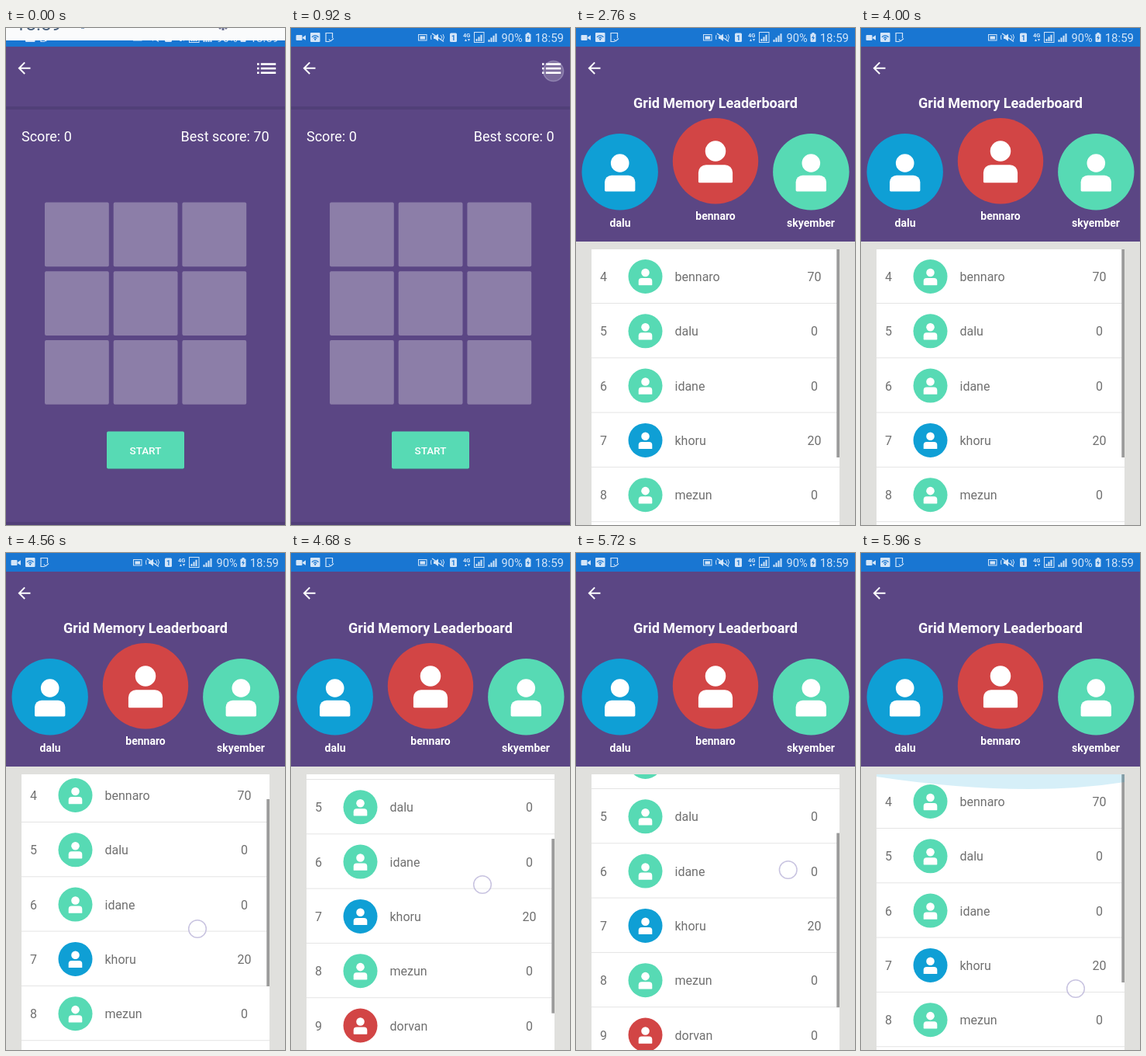
Recreate the animation shown at these times as an HTML page with a canvas. Size 360 by 640 pixels, loop 6 s.

```html
<!DOCTYPE html>
<html lang="en">
<head>
<meta charset="utf-8">
<title>Leaderboard</title>
<style>
html, body { margin: 0; width: 100%; height: 100%; overflow: hidden; background: #5b4684; }
canvas { display: block; width: 360px; height: 640px; }
</style>
</head>
<body>
<canvas id="stage"></canvas>
<script>
const W = 360, H = 640, LOOP = 6000, STEP = 40;
const PURPLE = '#5b4684', LINE = '#513f78', GREEN = '#57dab4', RED = '#d24545', BLUE = '#0f9fd5';
const BAR = '#1976d2', ICON = '#d3e5f8';
const LIST_TOP = 285, PITCH = 70.3, MAX_SCROLL = 133;
const ROWS = [
  [4, 'bennaro', 70, GREEN], [5, 'dalu', 0, GREEN], [6, 'idane', 0, GREEN],
  [7, 'khoru', 20, BLUE], [8, 'mezun', 0, GREEN], [9, 'dorvan', 0, RED], [10, 'tarven', 0, GREEN]
];
// Keyframes: [time, value]
const SCROLL = [[4520, 0], [4560, 8], [4680, 63], [4760, 101], [4840, MAX_SCROLL],
  [5560, MAX_SCROLL], [5600, 122], [5720, 51], [5800, 0]];
const DRAG_UP = [[4520, 502], [4560, 484], [4680, 427], [4880, 328]];
const DRAG_DOWN = [[5520, 318], [5560, 322], [5600, 337], [5720, 408], [5960, 561]];

const canvas = document.getElementById('stage');
const c = canvas.getContext('2d');
const dpr = window.devicePixelRatio || 1;
canvas.width = W * dpr;
canvas.height = H * dpr;

const clamp = v => Math.max(0, Math.min(1, v));
const ramp = (t, a, b) => clamp((t - a) / (b - a));

function track(keys, t) {
  if (t <= keys[0][0]) return keys[0][1];
  for (let i = 1; i < keys.length; i++) {
    const [a, va] = keys[i - 1], [b, vb] = keys[i];
    if (t <= b) return va + (vb - va) * (t - a) / (b - a);
  }
  return keys[keys.length - 1][1];
}

function rect(x, y, w, h, color) {
  c.fillStyle = color;
  c.fillRect(x, y, w, h);
}

function round(x, y, w, h, r, color) {
  c.fillStyle = color;
  c.beginPath();
  c.roundRect(x, y, w, h, r);
  c.fill();
}

function disc(x, y, r, color) {
  c.fillStyle = color;
  c.beginPath();
  c.arc(x, y, r, 0, 7);
  c.fill();
}

function poly(points, color) {
  c.fillStyle = color;
  c.beginPath();
  points.forEach(([x, y]) => c.lineTo(x, y));
  c.fill();
}

function text(s, x, y, size, color, align = 'left', weight = 400) {
  c.font = `${weight} ${size}px Roboto, sans-serif`;
  c.textAlign = align;
  c.fillStyle = color;
  c.fillText(s, x, y);
}

function stroke(points, color, width) {
  c.strokeStyle = color;
  c.lineWidth = width;
  c.beginPath();
  points.forEach(([x, y]) => c.lineTo(x, y));
  c.stroke();
}

function box(x, y, w, h) {
  c.strokeStyle = ICON;
  c.lineWidth = 1;
  c.strokeRect(x, y, w, h);
}

function bars(x, y, n) {
  for (let i = 0; i < n; i++) rect(x + i * 3, y - 3 - i * 2.6, 2, 3 + i * 2.6, ICON);
}

function waves(x, y, radii) {
  c.strokeStyle = BAR;
  c.lineWidth = 1.2;
  for (const r of radii) {
    c.beginPath();
    c.arc(x, y, r, -Math.PI * .8, -Math.PI * .2);
    c.stroke();
  }
}

function statusBar() {
  rect(0, 0, W, 24, BAR);
  // left icons
  round(6.5, 9, 8, 7, 1, ICON);
  poly([[15, 12], [19, 9.3], [19, 15.7], [15, 13.3]], ICON);
  round(25, 6, 12.5, 12, 1, ICON);
  waves(31.2, 15, [2.6, 5.2]);
  disc(31.2, 14.8, 1.1, BAR);
  stroke([[50, 17.5], [45, 17.5], [45, 6.5], [53.5, 6.5], [53.5, 13]], ICON, 1.2);
  stroke([[49, 14.5], [51, 17], [55, 13.5]], ICON, 1.2);
  // right icons
  box(164.5, 8.5, 10.5, 7.5);
  rect(166.5, 10.5, 6.5, 4, ICON);
  poly([[184, 10.5], [186, 10.5], [190, 7.5], [190, 17], [186, 14], [184, 14]], ICON);
  stroke([[182, 7], [197, 17.5]], ICON, 1.4);
  stroke([[181, 9], [180.5, 12], [181, 15]], ICON, 1);
  stroke([[193, 9], [195, 12], [193, 15]], ICON, 1);
  stroke([[196, 8], [197.5, 12], [196, 16]], ICON, 1);
  round(205, 6.5, 9, 11.5, 1.5, ICON);
  text('1', 209.5, 15.8, 9, BAR, 'center', 700);
  text('4G', 222, 12, 7.5, ICON, 'left', 700);
  poly([[224, 17], [227, 17], [225.5, 14]], ICON);
  poly([[228, 14], [231, 14], [229.5, 17]], ICON);
  box(236.5, 5.5, 12.5, 13);
  bars(238.5, 17, 3);
  bars(254.5, 18, 4);
  text('90%', 271.5, 17.8, 14.6, ICON);
  round(302.5, 7.5, 7, 10.5, 1, ICON);
  rect(304.5, 6, 3, 2, ICON);
  poly([[306.8, 8.8], [304, 13], [305.8, 13], [305.2, 16.6], [308, 12], [306.2, 12]], BAR);
  text('18:59', 352, 17.8, 15, ICON, 'right');
}

function backArrow() {
  const shape = new Path2D('M20 11H7.83l5.59-5.59L12 4l-8 8 8 8 1.41-1.41L7.83 13H20z');
  c.save();
  c.translate(11.5, 39.7);
  c.fillStyle = '#fff';
  c.fill(shape);
  c.restore();
}

function listIcon(alpha) {
  c.globalAlpha = alpha;
  for (let i = 0; i < 3; i++) {
    const y = 45.2 + i * 5.6;
    rect(324, y, 2.6, 2.6, '#fff');
    rect(328.8, y, 19.4, 2.6, '#fff');
  }
  c.globalAlpha = 1;
}

function touch(x, y, r = 11.3) {
  disc(x, y, r, 'rgba(255,255,255,.4)');
  c.strokeStyle = 'rgba(190,185,218,.85)';
  c.lineWidth = 1.5;
  c.beginPath();
  c.arc(x, y, r, 0, 7);
  c.stroke();
}

function avatar(x, y, r, color) {
  disc(x, y, r, color);
  round(x - .4 * r, y + .09 * r, .8 * r, .42 * r, [.18 * r, .18 * r, .03 * r, .03 * r], '#fff');
  disc(x, y - .23 * r, .28 * r, color);
  disc(x, y - .23 * r, .24 * r, '#fff');
}

// Notification panel sliding away above the status bar
function shade(t) {
  const h = 16 * (1 - ramp(t, 0, 200)) ** 2;
  if (h < .3) return;
  rect(0, 0, W, h, '#fafbfc');
  text('18:59', 12, h - 13, 24, '#48607c');
  c.save();
  c.translate(280, h - 20);
  for (let i = 0; i < 8; i++) {
    c.rotate(Math.PI / 4);
    rect(-1.5, 3, 3, 4, '#6d7191');
  }
  c.restore();
  rect(97, h - 17, 4, 2, '#8aa2bd');
}

function gameScreen(t) {
  rect(0, 0, W, H, PURPLE);
  rect(0, 101, W, 4, LINE);
  rect(0, 636, W, 4, LINE);
  statusBar();
  backArrow();
  const held = 1 - ramp(t, 1840, 2120);
  listIcon(held);
  if (t >= 920 && held > 0) {
    c.globalAlpha = held * .5;
    touch(338.6, 55.6, 13);
    c.globalAlpha = 1;
  }
  text('Score: 0', 20, 145.5, 18, '#fff');
  text('Best score: ' + (t < 80 ? 70 : 0), 339.5, 145.5, 18, '#fff', 'right');
  for (let i = 0; i < 9; i++)
    round(50 + i % 3 * 88.7, 224.5 + Math.floor(i / 3) * 88.7, 82.8, 82.8, 2, '#8c7ea8');
  round(130, 520.5, 100, 48, 2, '#4d557f');
  round(130, 519.5, 100, 48, 2, GREEN);
  text('START', 180, 549, 13.5, '#fff', 'center', 500);
  shade(t);
}

function glow(edge, depth, x) {
  c.fillStyle = 'rgba(15,159,213,.17)';
  c.beginPath();
  c.moveTo(20, edge);
  c.lineTo(20, edge + depth * .15);
  c.quadraticCurveTo(x - 70, edge + depth * 1.55, 340, edge + depth * .5);
  c.lineTo(340, edge);
  c.fill();
}

function list(t) {
  const scroll = track(SCROLL, t);
  rect(0, 275, W, 365, '#e0e0dd');
  c.save();
  c.beginPath();
  c.rect(20, LIST_TOP, 320, H - LIST_TOP);
  c.clip();
  rect(20, LIST_TOP, 320, H, '#fff');
  ROWS.forEach(([rank, name, score, color], i) => {
    const y = 320 + i * PITCH - scroll;
    text(rank, 31, y + 6, 16, '#707070');
    avatar(89.5, y, 22, color);
    text(name, 127.5, y + 6, 16, '#707070');
    text(score, 307.5, y + 6, 16, '#707070', 'center');
    rect(20, y + 34, 320, 1, '#e4e4e4');
  });
  // scroll indicator
  let alpha = 1;
  if (t < 4520) alpha = 1 - ramp(t, 4000, 4200);
  else if (t < 5560) alpha = 1 - ramp(t, 5120, 5360);
  const top = LIST_TOP + Math.min(scroll * 4, 44 + scroll * .62);
  c.globalAlpha = alpha;
  rect(336.3, top, 3.7, 553 + scroll * .63 - top, '#9b9b9b');
  c.globalAlpha = 1;
  if (t > 5800) glow(LIST_TOP, 20 * ramp(t, 5800, 5960), 277);
  if (t > 4840 && t < 5120) glow(H, -12 * (1 - ramp(t, 4880, 5120)), 250);
  c.restore();
}

function boardScreen(t) {
  rect(0, 0, W, H, PURPLE);
  statusBar();
  backArrow();
  text('Grid Memory Leaderboard', 180, 102.5, 18, '#fff', 'center', 700);
  avatar(56.7, 185.3, 49.2, BLUE);
  avatar(180, 171.2, 55.2, RED);
  avatar(303.3, 185.3, 49.2, GREEN);
  text('dalu', 57, 255.5, 14, '#fff', 'center', 700);
  text('bennaro', 180, 247, 14, '#fff', 'center', 700);
  text('skyember', 303, 255.5, 14, '#fff', 'center', 700);
  list(t);
  if (t >= 4520 && t <= 4880) touch(247, track(DRAG_UP, t));
  if (t >= 5520) touch(271 + 6 * ramp(t, 5520, 5960), track(DRAG_DOWN, t));
}

function frame(now) {
  const t = Math.floor(now % LOOP / STEP) * STEP;
  c.setTransform(dpr, 0, 0, dpr, 0, 0);
  (t < 2760 ? gameScreen : boardScreen)(t);
  requestAnimationFrame(frame);
}
frame(performance.now());
</script>
</body>
</html>
```
